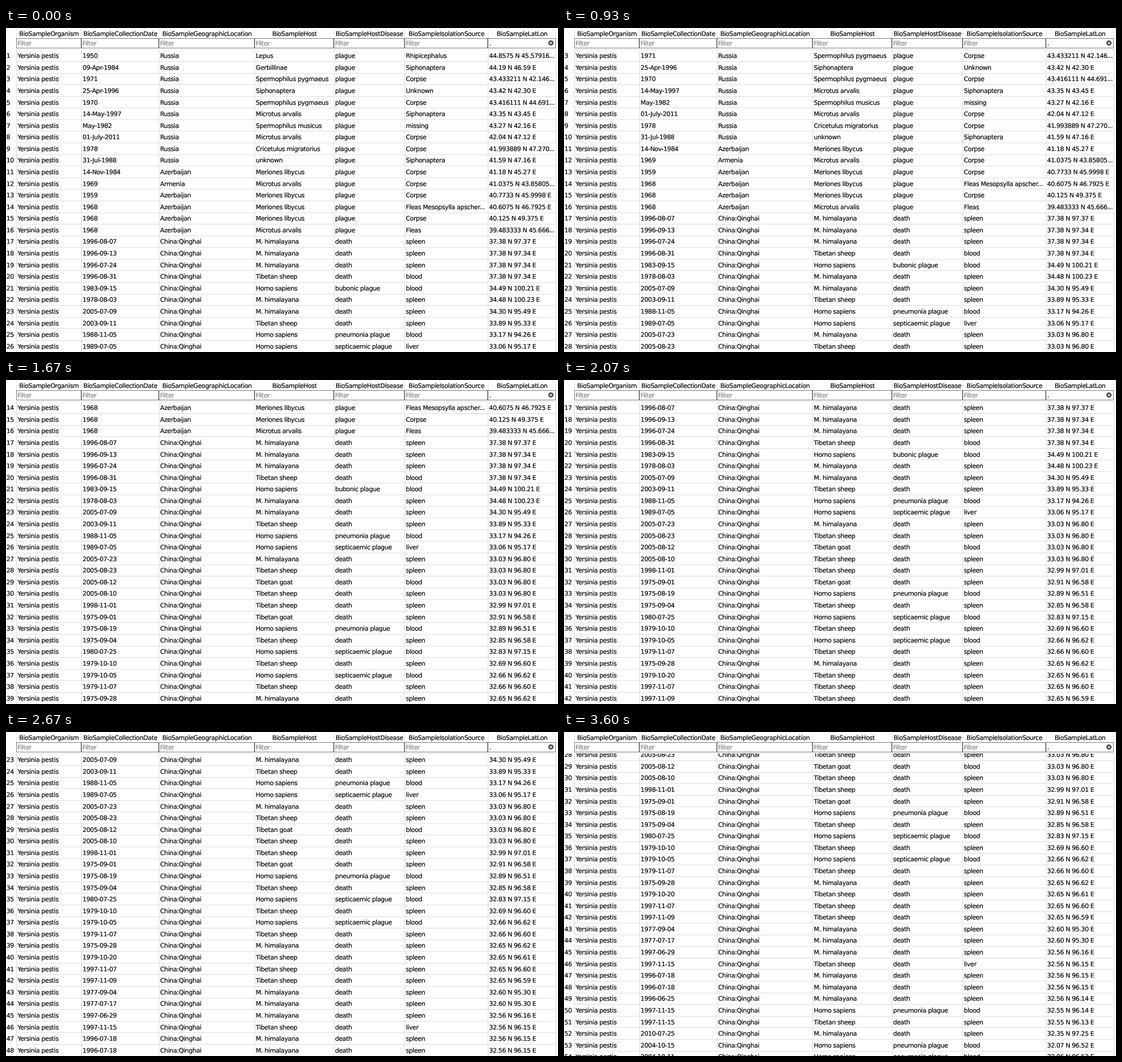
Animation, 975 px wide and 574 px high, one loop 4.07 s. Source, as an HTML page with a canvas:

```html
<!DOCTYPE html>
<html lang="en">
<head>
<meta charset="utf-8">
<title>Sample table</title>
<style>
html, body { margin: 0; width: 100%; height: 100%; overflow: hidden; background: #fff; }
canvas { display: block; }
</style>
</head>
<body>
<canvas id="stage" width="975" height="574"></canvas>
<script>
const ctx = document.getElementById('stage').getContext('2d');
const LOOP = 4070, PITCH = 20.58, TOP = 38, FIRST = 53.2;
const edges = [18, 133, 270, 439, 579, 704, 851, 971];
const heads = ['Organism', 'CollectionDate', 'GeographicLocation', 'Host',
  'HostDisease', 'IsolationSource', 'LatLon'];

const west = `1950|Russia|Lepus|Rhipicephalus|44.8575 N 45.57916...
09-Apr-1984|Russia|Gerbillinae|Siphonaptera|44.19 N 46.59 E
1971|Russia|Spermophilus pygmaeus|Corpse|43.433211 N 42.146...
25-Apr-1996|Russia|Siphonaptera|Unknown|43.42 N 42.30 E
1970|Russia|Spermophilus pygmaeus|Corpse|43.416111 N 44.691...
14-May-1997|Russia|Microtus arvalis|Siphonaptera|43.35 N 43.45 E
May-1982|Russia|Spermophilus musicus|missing|43.27 N 42.16 E
01-July-2011|Russia|Microtus arvalis|Corpse|42.04 N 47.12 E
1978|Russia|Cricetulus migratorius|Corpse|41.993889 N 47.270...
31-Jul-1988|Russia|unknown|Siphonaptera|41.59 N 47.16 E
14-Nov-1984|Azerbaijan|Meriones libycus|Corpse|41.18 N 45.27 E
1969|Armenia|Microtus arvalis|Corpse|41.0375 N 43.85805...
1959|Azerbaijan|Meriones libycus|Corpse|40.7733 N 45.9998 E
1968|Azerbaijan|Meriones libycus|Fleas Mesopsylla apscher...|40.6075 N 46.7925 E
1968|Azerbaijan|Meriones libycus|Corpse|40.125 N 49.375 E
1968|Azerbaijan|Microtus arvalis|Fleas|39.483333 N 45.666...`;

// date, codes for host + disease + tissue, latitude, longitude
const east = `1996-08-07 Mds 37.38 97.37
1996-09-13 Mds 37.38 97.34
1996-07-24 Mds 37.38 97.34
1996-08-31 Sdb 37.38 97.34
1983-09-15 Hbb 34.49 100.21
1978-08-03 Mds 34.48 100.23
2005-07-09 Mds 34.30 95.49
2003-09-11 Sds 33.89 95.33
1988-11-05 Hpb 33.17 94.26
1989-07-05 Hsl 33.06 95.17
2005-07-23 Mds 33.03 96.80
2005-08-23 Sds 33.03 96.80
2005-08-12 Gdb 33.03 96.80
2005-08-10 Sds 33.03 96.80
1998-11-01 Sds 32.99 97.01
1975-09-01 Gds 32.91 96.58
1975-08-19 Hpb 32.89 96.51
1975-09-04 Sds 32.85 96.58
1980-07-25 Hsb 32.83 97.15
1979-10-10 Sds 32.69 96.60
1979-10-05 Hsb 32.66 96.62
1979-11-07 Sds 32.66 96.60
1975-09-28 Mds 32.65 96.62
1979-10-20 Sds 32.65 96.61
1997-11-07 Sds 32.65 96.60
1997-11-09 Sds 32.65 96.59
1977-09-04 Mds 32.60 95.30
1977-07-17 Mds 32.60 95.30
1997-06-29 Mds 32.56 96.16
1997-11-15 Sdl 32.56 96.15
1996-07-18 Mds 32.56 96.15
1996-07-18 Mds 32.56 96.15
1996-06-25 Mds 32.56 96.14
1997-11-15 Hpb 32.55 96.14
1997-11-15 Sds 32.55 96.13
2010-07-25 Mds 32.35 97.25
2004-10-15 Hpb 32.07 96.52
2004-10-11 Hpb 32.06 96.52`;

const hosts = { M: 'M. himalayana', S: 'Tibetan sheep', G: 'Tibetan goat', H: 'Homo sapiens' };
const diseases = { d: 'death', b: 'bubonic plague', p: 'pneumonia plague', s: 'septicaemic plague' };
const tissues = { s: 'spleen', b: 'blood', l: 'liver' };

const rows = [
  ...west.split('\n').map(line => {
    const [date, place, host, tissue, pos] = line.split('|');
    return [date, place, host, 'plague', tissue, pos];
  }),
  ...east.split('\n').map(line => {
    const [date, [h, d, t], lat, lon] = line.split(' ');
    return [date, 'China:Qinghai', hosts[h], diseases[d], tissues[t], `${lat} N ${lon} E`];
  })
].map(cells => ['Yersinia pestis', ...cells]);

// [time in ms, row at the top of the view]
const early = [[0, 1], [730, 2], [930, 3], [1000, 4], [1130, 5], [1200, 6], [1270, 7],
  [1330, 8], [1400, 9], [1530, 11], [1600, 12], [1670, 14]];
const late = [1870, 1930, 2070, 2130, 2270, 2330, 2470, 2530, 2670, 2730, 2870, 3070, 3330]
  .map((time, i) => [time, 15 + i]);
const scroll = [...early, ...late, [3600, 28.437]];

function topRow(time) {
  let top = 1;
  for (const [start, row] of scroll) if (time >= start) top = row;
  return top;
}

// A hairline outline gives the letters their firm screen weight.
function text(str, x, y, color = '#000', align = 'left') {
  ctx.fillStyle = ctx.strokeStyle = color;
  ctx.lineWidth = 0.2;
  ctx.textAlign = align;
  ctx.fillText(str, x, y);
  ctx.strokeText(str, x, y);
}

function rect(x, y, w, h, color) {
  ctx.fillStyle = color;
  ctx.fillRect(x, y, w, h);
}

function drawClear(x, y) {
  ctx.fillStyle = '#444';
  ctx.beginPath();
  ctx.arc(x, y, 4.6, 0, Math.PI * 2);
  ctx.fill();
  ctx.strokeStyle = '#fff';
  ctx.lineWidth = 1.3;
  ctx.beginPath();
  ctx.moveTo(x - 1.9, y - 1.9);
  ctx.lineTo(x + 1.9, y + 1.9);
  ctx.moveTo(x + 1.9, y - 1.9);
  ctx.lineTo(x - 1.9, y + 1.9);
  ctx.stroke();
}

function drawHeader() {
  rect(18, 0, 1, 18, '#e2e2e2');
  heads.forEach((name, i) => {
    const left = edges[i], right = edges[i + 1];
    rect(right, 0, 1, 18, '#e2e2e2');
    text('BioSample' + name, (left + right) / 2 + 0.5, 14, '#000', 'center');
    ctx.strokeStyle = '#7a7a7a';
    ctx.lineWidth = 1;
    ctx.strokeRect(left + 0.5, 18.5, right - left - 1, 17);
    if (i < 6) text('Filter', left + 2, 31, '#808080');
  });
  text('.', 853.5, 31);
  drawClear(962.5, 26.5);
}

function drawRows(top) {
  ctx.save();
  ctx.beginPath();
  ctx.rect(0, TOP, 975, 574 - TOP);
  ctx.clip();
  for (const x of edges) rect(x, TOP, 1, 574 - TOP, '#dcdcdc');
  rows.forEach((cells, i) => {
    const y = FIRST + (i + 1 - top) * PITCH;
    if (y < 30 || y > 590) return;
    rect(18, Math.round(y + 5.8), 954, 1, '#dcdcdc');
    text(i + 1, 0.7, Math.round(y));
    cells.forEach((cell, c) => text(cell, edges[c] + 2.3, Math.round(y)));
  });
  ctx.restore();
}

function draw(time) {
  rect(0, 0, 975, 574, '#fff');
  ctx.font = '11px "DejaVu Sans", sans-serif';
  ctx.letterSpacing = '-0.38px';
  ctx.textRendering = 'geometricPrecision';
  drawRows(topRow(time));
  drawHeader();
}

const begin = performance.now();
function tick() {
  draw((performance.now() - begin) % LOOP);
  requestAnimationFrame(tick);
}
tick();
</script>
</body>
</html>
```
